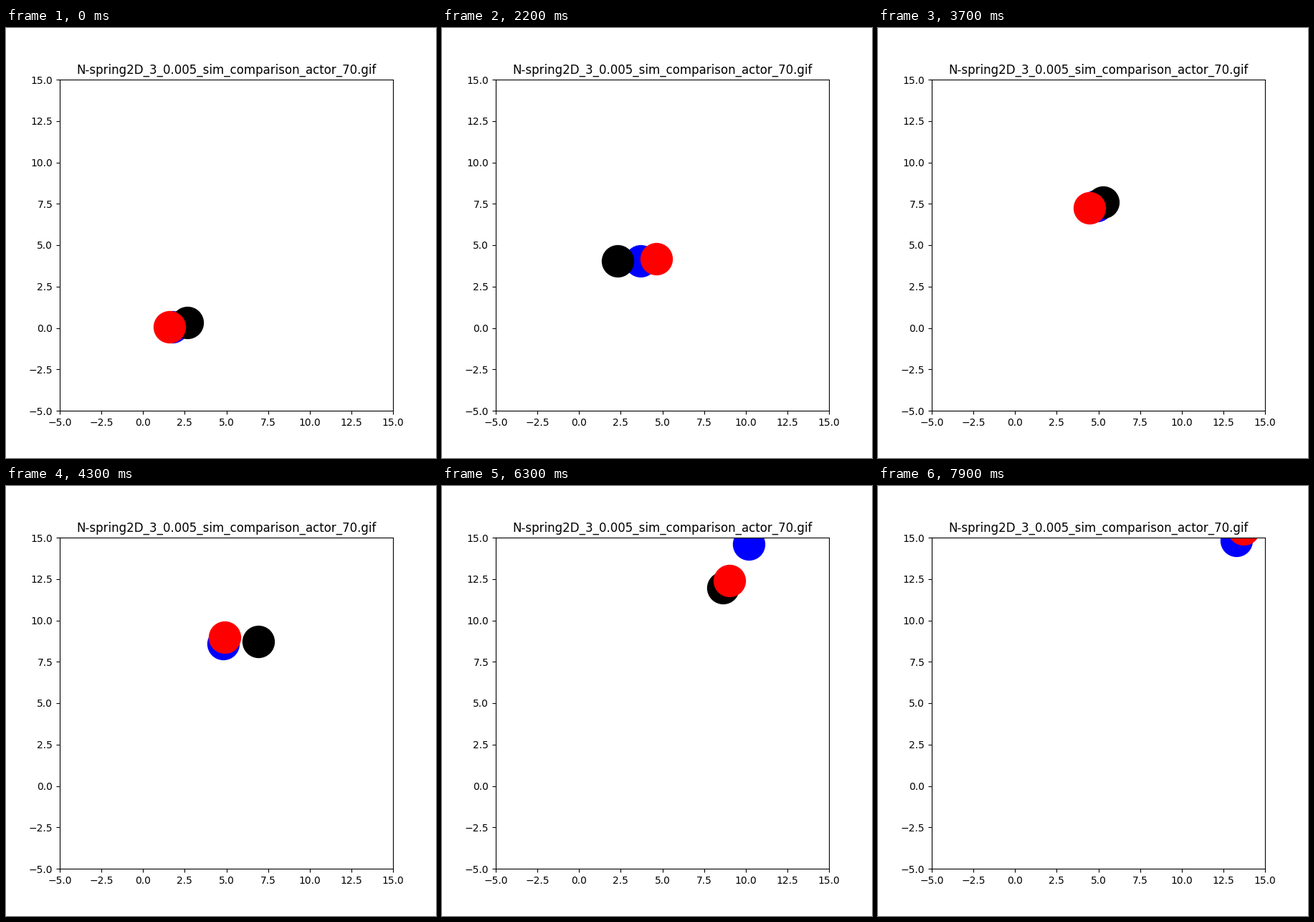
A matplotlib script for the animation above (8000 ms loop, 600x600 px).

```python
import numpy as np
import matplotlib.pyplot as plt
from matplotlib.animation import FuncAnimation

FRAMES, INTERVAL = 80, 100

# A few way points per ball as x + yj in data units; the motion between
# them is the natural cubic spline, the least bent curve through them.
KEYS = np.array([0, 1.2, 2.2, 3.1, 4.3, 5.2, 6.3, 7.9])
PATHS = {
    "blue": [1.76 + .08j, 1.74 + 1.42j, 3.68 + 4.06j, 5.01 + 6.32j,
             4.79 + 8.59j, 6.28 + 11.51j, 10.19 + 14.63j, 13.29 + 14.84j],
    "black": [2.64 + .32j, 3.33 + 2.16j, 2.32 + 4.06j, 3.52 + 6.14j,
              6.92 + 8.72j, 7.83 + 9.69j, 8.62 + 11.97j, 14.88 + 16.19j],
    "red": [1.57 + .06j, 3.31 + 2.55j, 4.64 + 4.17j, 4.49 + 5.69j,
            4.88 + 9.00j, 6.45 + 11.19j, 9.01 + 12.42j, 13.72 + 15.52j],
}


def basis(t):
    """Cubic spline basis: |t - key|^3 for each key, then a straight line."""
    t = np.atleast_1d(t)[:, None]
    return np.hstack([abs(t - KEYS) ** 3, np.ones_like(t), t])


def spline(points):
    """Positions of one ball in every frame."""
    line = np.vstack([np.ones_like(KEYS), KEYS])
    system = np.vstack([basis(KEYS), np.hstack([line, np.zeros((2, 2))])])
    weights = np.linalg.solve(system, np.array(points + [0, 0]))
    z = basis(np.arange(FRAMES) * INTERVAL / 1000) @ weights
    return np.column_stack([z.real, z.imag])


fig, ax = plt.subplots(figsize=(6, 6), dpi=100)
ticks = np.linspace(-5, 15, 9)
ax.set(xlim=(-5, 15), ylim=(-5, 15), xticks=ticks, yticks=ticks,
       title="N-spring2D_3_0.005_sim_comparison_actor_70.gif")

tracks = {color: spline(points) for color, points in PATHS.items()}
balls = {color: ax.scatter(*track[0], s=1000, color=color)
         for color, track in tracks.items()}


def update(frame):
    for color, ball in balls.items():
        ball.set_offsets(tracks[color][frame])
    return list(balls.values())


anim = FuncAnimation(fig, update, frames=FRAMES, interval=INTERVAL,
                     repeat=True, repeat_delay=0)
plt.show()
```
